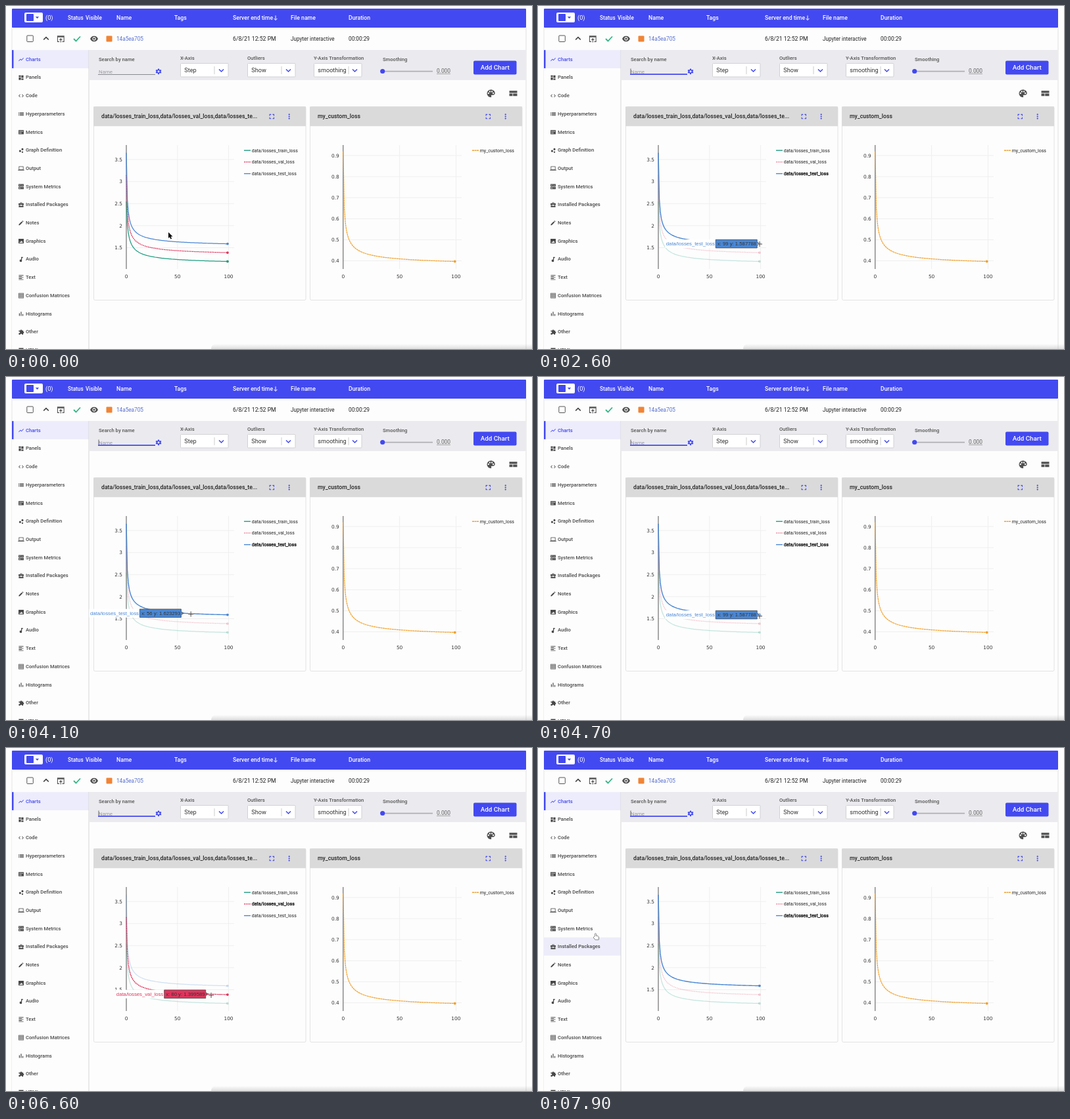
An HTML page with a canvas for the animation above (8 s loop, 800 px wide and 523 px high).

```html
<!DOCTYPE html>
<html lang="en">
<head>
<meta charset="utf-8">
<title>Loss charts</title>
<style>
html, body { margin: 0; width: 100%; height: 100%; overflow: hidden; background: #fff; }
canvas { display: block; width: 800px; height: 523px; }
</style>
</head>
<body>
<canvas id="stage"></canvas>
<script>
const canvas = document.getElementById('stage');
const ratio = window.devicePixelRatio || 1;
canvas.width = 800 * ratio;
canvas.height = 523 * ratio;
const ctx = canvas.getContext('2d');
ctx.scale(ratio, ratio);

const BLUE = '#4349f0', INK = '#484848', ROW = 27.7, TOP = 67.2;
const ROBOTO = 'Roboto, sans-serif', ARIAL = '"Liberation Sans", Arial, sans-serif', VERDANA = '"DejaVu Sans", Verdana, sans-serif';

function rect(x, y, w, h, fill, stroke, radius = 0) {
  ctx.beginPath();
  ctx.roundRect(x, y, w, h, radius);
  if (fill) { ctx.fillStyle = fill; ctx.fill(); }
  if (stroke) { ctx.strokeStyle = stroke; ctx.lineWidth = 1; ctx.stroke(); }
}
function line(points, color, width = 1, dash = []) {
  ctx.beginPath();
  points.forEach(([x, y]) => ctx.lineTo(x, y));
  ctx.strokeStyle = color;
  ctx.lineWidth = width;
  ctx.setLineDash(dash);
  ctx.stroke();
  ctx.setLineDash([]);
}
function dot(x, y, r, color) {
  ctx.beginPath();
  ctx.arc(x, y, r, 0, 7);
  ctx.fillStyle = color;
  ctx.fill();
}
function text(str, x, y, size, color = INK, weight = 400, family = ROBOTO, align = 'left') {
  ctx.font = `${weight} ${size}px ${family}`;
  ctx.textAlign = align;
  ctx.fillStyle = color;
  ctx.fillText(str, x, y);
}
// Icon outlines live in a 24 unit box
function icon(d, cx, cy, size, color = INK) {
  ctx.save();
  ctx.translate(cx - size / 2, cy - size / 2);
  ctx.scale(size / 24, size / 24);
  ctx.fillStyle = color;
  ctx.fill(new Path2D(d), 'evenodd');
  ctx.restore();
}
function chevron(x, y, dir, color, w = 3.5) {
  line([[x - w, y - dir * w / 2], [x, y + dir * w / 2], [x + w, y - dir * w / 2]], color, 1.5);
}

const GEAR = 'M10 1h4l1 4 2 1 4-1 2 4-3 3 3 3-2 4-4-1-2 1-1 4h-4l-1-4-2-1-4 1-2-4 3-3-3-3 2-4 4 1 2-1zM12 8a4 4 0 1 0 .1 0z';
const PALETTE = 'M12 2a10 10 0 0 0 0 20c2 0 2-2 1.200-3.200-.8-1.500.2-2.800 1.800-2.800h3c3 0 5-2 5-5 0-5-5-9-11-9zM6 9.500a2 2 0 1 0 .1 0zM9.500 5a2 2 0 1 0 .1 0zM15 5a2 2 0 1 0 .1 0zM18.500 9.500a2 2 0 1 0 .1 0z';
const FULL = 'M2 2h7v3H5v4H2zM15 2h7v7h-3V5h-4zM2 15h3v4h4v3H2zM19 15h3v7h-7v-3h4z';
const EYE = 'M12 4C6 4 2.500 8 1 12c1.500 4 5 8 11 8s9.500-4 11-8c-1.500-4-5-8-11-8zM12 7a5 5 0 1 0 .1 0zM12 9a3 3 0 1 1-.1 0z';
const BROWSER = 'M2 3h20v18h-6v-2h4V8H4v11h4v2H2zM12 10l5 5h-4v7h-2v-7H7z';

const menu = [
  ['Charts', 'M3.500 18.500l6-6 4 4L22 7l-1.500-1.500-7 8-4-4L2 17z'],
  ['Panels', 'M3 3h8v6H3zM3 11h8v10H3zM13 3h8v10h-8zM13 15h8v6h-8z'],
  ['Code', 'M9.400 16.600L4.800 12l4.600-4.600L8 6l-6 6 6 6zM14.600 16.600l4.600-4.600-4.600-4.600L16 6l6 6-6 6z'],
  ['Hyperparameters', 'M2 6h3v3H2zM7 6h15v3H7zM2 11h3v3H2zM7 11h15v3H7zM2 16h3v3H2zM7 16h15v3H7z'],
  ['Metrics', 'M2 4h20v16H2zM4 8h16v2H4zM5 14h3v3H5zM10 14h3v3h-3z'],
  ['Graph Definition', 'M8 11a4 4 0 1 0 .1 0zM17 4a4 4 0 1 0 .1 0zM17 16a3 3 0 1 0 .1 0z'],
  ['Output', 'M3 4h18v13h3v3H0v-3h3zM5 6v10h14V6z'],
  ['System Metrics', 'M2 2h20v9H2zM2 13h20v9H2zM5 5h4v3H5zM5 16h4v3H5zM12 6h8v1h-8zM12 17h8v1h-8z'],
  ['Installed Packages', 'M8 3h8v4h6v6h-8v-2h-4v2H2V7h6zM10 5v2h4V5zM3 15h7v2h4v-2h7v6H3z'],
  ['Notes', 'M3 17.500V21h3.500l11-11L14 6.500zM15.500 5l3.500 3.500 2-2L17.500 3z'],
  ['Graphics', 'M2 3h20v18H2zM5 18h14l-5-7-4 5-2-2z'],
  ['Audio', 'M12 3v10.500a4.500 4.500 0 1 0 3 4V7h4V3z'],
  ['Text', 'M3 3h18v2H3zM3 7h12v2H3zM3 11h18v2H3zM3 15h12v2H3zM3 19h18v2H3z'],
  ['Confusion Matrices', 'M2 2h20v20H2zM4 4v4h4V4zM10 4v4h4V4zM16 4v4h4V4zM4 10v4h4v-4zM10 10v4h4v-4zM16 10v4h4v-4zM4 16v4h4v-4zM10 16v4h4v-4zM16 16v4h4v-4z'],
  ['Histograms', 'M4 10h3v10H4zM10.500 4h3v16h-3zM17 13h3v7h-3z'],
  ['Other', 'M9 6a3 3 0 1 1 6 0h5v5a3 3 0 1 1 0 6v5h-5a3 3 0 1 0-6 0H3v-6a3 3 0 1 0 0-5V6z'],
  ['HTML', 'M3 4h18v16H3zM5 8v10h14V8z']
];

const decay = (base, gain, power, shift) => x => base + gain / (x + shift) ** power;
const losses = [
  { name: 'data/losses_train_loss', color: '#1f9c80', f: decay(1.1, 1.387, .6, .93) },
  { name: 'data/losses_val_loss', color: '#e0345c', f: decay(1.3, 1.387, .6, .62), dash: [2, .7] },
  { name: 'data/losses_test_loss', color: '#4a87d4', f: decay(1.5, 1.387, .6, .48) }
];
const custom = [{ name: 'my_custom_loss', color: '#f2a12e', f: decay(.37, .338, .55, .413), dash: [3, .5] }];
const left = { x0: 183, dx: 1.555, end: 347, base: 368.5, from: 1.5, scale: 67.2, step: .5, count: 5, legend: 362 };
const right = { x0: 512.8, dx: 1.716, end: 693, base: 388.5, from: .4, scale: 321, step: .1, count: 6, legend: 709 };
const px = (p, x) => p.x0 + p.dx * x;
const py = (p, v) => p.base - (v - p.from) * p.scale;

// Pointer path: time, x, y
const path = [
  [0, 247, 345], [1200, 337, 363], [2900, 337, 363], [3100, 322, 362], [3500, 307, 362],
  [4000, 270, 361], [4600, 337, 364], [4800, 337, 365], [5100, 337, 376], [5500, 330, 376],
  [5700, 314, 376], [5900, 282, 376], [6200, 265, 376], [6500, 307.5, 377], [6600, 312, 377],
  [6800, 320, 377], [7100, 230, 360], [7500, 100, 330], [7900, 88, 283]
];
function pointerAt(t) {
  let i = 1;
  while (i < path.length - 1 && path[i][0] < t) i++;
  const [ta, xa, ya] = path[i - 1], [tb, xb, yb] = path[i];
  const k = Math.min(1, Math.max(0, (t - ta) / (tb - ta)));
  return [xa + (xb - xa) * k, ya + (yb - ya) * k];
}

function topBars() {
  rect(9, 4, 782, 29, BLUE, null, 1);
  rect(28, 10, 28, 15, '#fff', null, 2);
  rect(31, 12, 11, 11, BLUE, null, 1);
  icon('M4 8h16l-8 9z', 47.5, 17.5, 8, BLUE);
  text('(0)', 60, 21, 9.2, '#fff');
  const heads = [['Status', 94, 8.2], ['Visible', 121, 8.2], ['Name', 168, 8.7], ['Tags', 256, 8.7],
    ['Server end time', 345, 8.7], ['File name', 433, 8.7], ['Duration', 521, 8.7]];
  heads.forEach(([s, x, size]) => text(s, x, 21.3, size, '#fff', 500));
  line([[410, 14.5], [410, 21.5]], '#fff');
  line([[407.5, 19], [410, 21.5], [412.5, 19]], '#fff');

  rect(31.8, 45, 9.5, 9.5, null, '#555', 1);
  chevron(61, 49.5, -1, '#444', 3.8);
  icon(BROWSER, 83.3, 50, 13, '#555');
  line([[103, 50], [106.500, 53.500], [113, 46.500]], '#35b384', 1.8);
  icon(EYE, 134, 50, 13, '#505050');
  rect(152.5, 45.5, 9, 9, '#f08436', null, 1);
  text('14a5ea705', 168, 52.5, 8.2, '#5870d0');
  text('6/8/21 12:52 PM', 345, 52.7, 8.7, '#222');
  text('Jupyter interactive', 433, 52.7, 8.15, '#222');
  text('00:00:29', 521, 52.7, 8.3, '#222');
}

function sidebar(hoverRow) {
  rect(9, 67, 117, 456, '#fdfdfd');
  rect(9, TOP, 117, ROW, '#ececfc');
  if (hoverRow > 0) rect(9, TOP + ROW * hoverRow, 117, ROW, '#ececfa');
  rect(9, TOP, 2.5, ROW, BLUE);
  menu.forEach(([name, d], i) => {
    const y = 81 + ROW * i, color = i ? INK : BLUE;
    icon(d, 23, y + .5, 9.5, color);
    text(name, 30, y + 2.7, 7.65, color, 500);
  });
  line([[126, 67], [126, 523]], '#d5d5d8');
}

function filters(focused) {
  rect(126.5, 67, 664, 46, '#ebebef');
  const labels = [['Search by name', 141, 83.8], ['X-Axis', 265, 82], ['Outliers', 367, 82],
    ['Y-Axis Transformation', 468, 82], ['Smoothing', 573, 83.8]];
  labels.forEach(([s, x, y]) => text(s, x, y, 7.65, '#555', 500));
  text('Name', 141, 102.6, 7.9, '#9a9aa2');
  if (focused) {
    rect(140, 103.3, 87, 1.7, BLUE);
    line([[141, 95.5], [141, 103]], '#444', .8);
  } else rect(140, 104, 87, 1, '#888890');
  icon(GEAR, 232, 99.8, 9.5, BLUE);
  [['Step', 265, 52], ['Show', 367, 52], ['smoothing', 468, 53]].forEach(([s, x, split]) => {
    rect(x + .5, 87.5, 72.5, 20.5, '#fff', '#d2d2d6', 1);
    text(s, x + 6.3, 101, 9.1, '#333');
    line([[x + split, 92], [x + split, 104]], '#ccc');
    chevron(x + 62.5, 98.2, 1, BLUE);
  });
  rect(573, 98.7, 76, 1.8, '#b0b0b4');
  dot(572.7, 99.5, 3.6, BLUE);
  text('0.000', 655, 101.8, 8.4, '#666');
  line([[655, 103.5], [676, 103.5]], '#999', .8);
  rect(711, 83.5, 65.5, 21, BLUE, null, 2);
  text('Add Chart', 743.7, 97.4, 9.75, '#fff', 500, ROBOTO, 'center');
  icon(PALETTE, 737.3, 133.3, 14, '#505050');
  icon('M1 5h22v6H1zM1 13h9v7H1zM11.500 13H23v7H11.500z', 771.5, 133, 13, '#505050');
}

function card(x, title) {
  rect(x + .5, 153.5, 322.5, 295, '#fdfdfd', '#e3e3e3', 2);
  rect(x, 153.5, 323, 29.7, '#dadada');
  text(title, x + 12, 171.2, 8.7, '#222', 500);
  icon(FULL, x + 271.3, 168.5, 9, BLUE);
  [-3.1, 0, 3.1].forEach(d => dot(x + 297.7, 168.5 + d, 1.1, BLUE));
}

function plot(p, series, active) {
  for (let i = 0; i < p.count; i++) {
    const v = p.from + i * p.step, y = py(p, v);
    line([[p.x0, y], [p.end, y]], '#efefef');
    text(String(+v.toFixed(1)), p.x0 - 6, y + 2.6, 7.4, '#333', 400, VERDANA, 'right');
  }
  [0, 50, 100].forEach(v => {
    const x = px(p, v);
    line([[x, 212], [x, 401]], v ? '#efefef' : '#555');
    text(v, x, 414.7, 7.4, '#333', 400, VERDANA, 'center');
  });
  series.forEach((s, i) => {
    const y = 220.2 + 17.7 * i, strong = s === active;
    ctx.globalAlpha = active && !strong ? .25 : 1;
    const points = Array.from({ length: 100 }, (_, n) => [px(p, n), py(p, s.f(n))]);
    line(points, s.color, strong ? 1.4 : 1.25, s.dash);
    dot(px(p, 99), py(p, s.f(99)), 1.9, s.color);
    ctx.globalAlpha = active && !strong && i === 1 ? .6 : 1;
    line([[p.legend, y], [p.legend + 10, y]], s.color, 1.4, s.dash);
    ctx.globalAlpha = 1;
    text(s.name, p.legend + 11.7, y + 2.4, 7, '#222');
    if (strong) {
      ctx.strokeStyle = '#222';
      ctx.lineWidth = .4;
      ctx.strokeText(s.name, p.legend + 11.7, y + 2.4);
    }
  });
}

function tooltip(s, n) {
  const x = px(left, n), y = py(left, s.f(n)), box = x - 66.7;
  ctx.font = `7.74px ${ARIAL}`;
  const w = ctx.measureText(s.name).width;
  rect(box - w - 3, y - 6.5, w + 3, 13, '#fff');
  text(s.name, box - 1.500, y + 2.7, 7.74, s.color, 400, ARIAL, 'right');
  ctx.beginPath();
  [[0, -6.3], [63, -6.3], [63, -2.5], [66.7, 0], [63, 2.5], [63, 6.3], [0, 6.3]]
    .forEach(([a, b]) => ctx.lineTo(box + a, y + b));
  ctx.closePath();
  ctx.fillStyle = s.color;
  ctx.fill();
  ctx.strokeStyle = '#444';
  ctx.lineWidth = .8;
  ctx.stroke();
  text(`x: ${n} y: ${s.f(n).toFixed(6)}`, box + 2.5, y + 2.7, 7.74, '#333', 400, ARIAL);
}

function pointer(kind, x, y) {
  if (kind === 'cross') {
    const arms = (c, w) => {
      line([[x - 4, y], [x + 4, y]], c, w);
      line([[x, y - 4], [x, y + 4]], c, w);
    };
    arms('#fff', 2);
    arms('#333', .9);
    return;
  }
  const arrow = 'M0 0v9l2-1.800 1.500 3.300 1.500-.7-1.400-3.200h2.900z';
  const hand = 'M-1.500 4.500V.8q0-1 .9-1t.9 1v2.700l3 .7q1.200.3 1.100 1.500l-.5 3.800H-.8l-2.500-3.500q-.2-1 .6-1z';
  const shape = new Path2D(kind === 'hand' ? hand : arrow);
  ctx.save();
  ctx.translate(x, y);
  ctx.lineJoin = 'round';
  ctx.lineWidth = 1;
  ctx.strokeStyle = kind === 'hand' ? '#222' : '#fff';
  ctx.fillStyle = kind === 'hand' ? '#fff' : '#000';
  ctx.stroke(shape);
  ctx.fill(shape);
  ctx.restore();
}

function draw(t) {
  const [x, y] = pointerAt(t), [lateX, lateY] = pointerAt(t - 100);
  const hovering = t >= 1500;
  const active = !hovering ? null : losses[t >= 4900 && t < 6900 ? 1 : 2];
  const row = lateX < 126 ? Math.floor((lateY - TOP) / ROW) : -1;

  rect(0, 0, 800, 523, '#fdfdfd');
  line([[9, 33], [9, 523]], '#e4e4e6');
  line([[791, 33], [791, 523]], '#e0e0e2');
  topBars();
  sidebar(row);
  filters(hovering);
  card(133, 'data/losses_train_loss,data/losses_val_loss,data/losses_te...');
  card(462, 'my_custom_loss');
  plot(left, losses, active);
  plot(right, custom, null);

  const shade = ctx.createLinearGradient(0, 515, 0, 523);
  shade.addColorStop(0, 'rgba(150,150,150,0)');
  shade.addColorStop(1, 'rgba(150,150,150,.3)');
  rect(312, 515, 488, 8, shade, null, [8, 0, 0, 0]);

  if (hovering && t < 7100) {
    const n = Math.round((lateX - left.x0) / left.dx);
    tooltip(active, Math.min(99, Math.max(0, n)));
  }
  pointer(x < 126 ? 'hand' : hovering && x > left.x0 ? 'cross' : 'arrow', x, y);
}

function frame(now) {
  draw(Math.floor(now % 8000 / 100) * 100);
  requestAnimationFrame(frame);
}
frame(performance.now());
</script>
</body>
</html>
```
